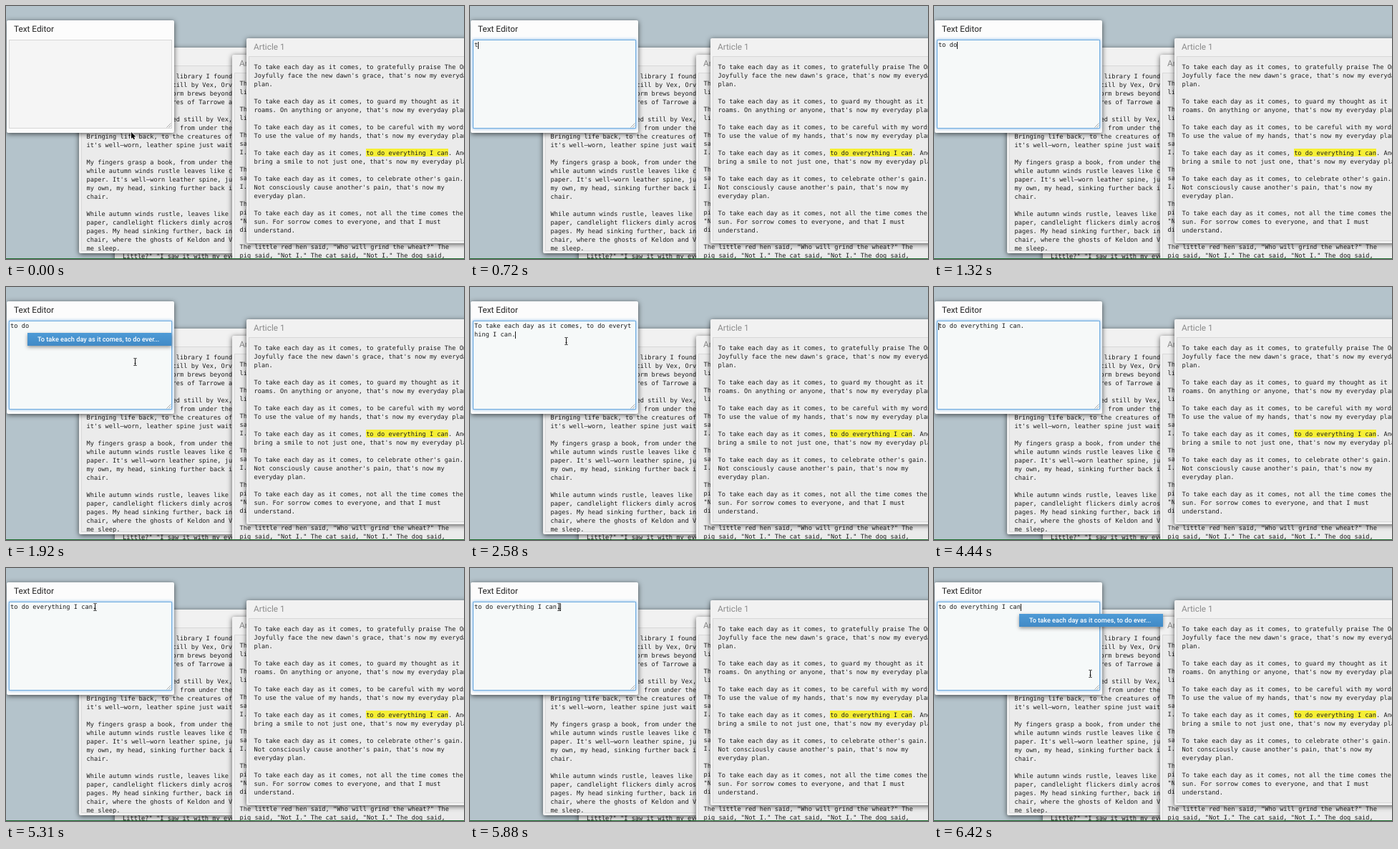
These frames come from a looping animation (640x353 px, 6450 ms). An HTML page with a canvas:

```html
<!DOCTYPE html>
<html lang="en">
<head>
<meta charset="utf-8">
<title>Text Editor</title>
<style>
  html, body { margin: 0; width: 100%; height: 100%; overflow: hidden; background: #b4c3cb; }
  canvas { display: block; }
</style>
</head>
<body>
<canvas id="stage" width="640" height="353"></canvas>
<script>
const LOOP = 6450;
const CHAR = 5.23;
const LINE = 12;
const MONO = '8.69px "DejaVu Sans Mono", monospace';
const TITLE = '11.8px Roboto, sans-serif';
const MENU = '500 9.2px Roboto, sans-serif';
const INK = '#1c1c1c';
const ctx = document.getElementById('stage').getContext('2d');
ctx.textRendering = 'geometricPrecision';

const plan = `To take each day as it comes, to gratefully praise The One.
Joyfully face the new dawn's grace, that's now my everyday
plan.

To take each day as it comes, to guard my thought as it
roams. On anything or anyone, that's now my everyday plan.

To take each day as it comes, to be careful with my words.
To use the value of my hands, that's now my everyday plan.

To take each day as it comes, to do everything I can. And
bring a smile to not just one, that's now my everyday plan.

To take each day as it comes, to celebrate other's gain.
Not consciously cause another's pain, that's now my
everyday plan.

To take each day as it comes, not all the time comes the
sun. For sorrow comes to everyone, and that I must
understand.`.split('\n');

const hen = `The
li

Th
li

Th
sa
I.

Th
sa
I.

Th
pi
"N
di

The little red hen said, "Who will grind the wheat?" The
pig said, "Not I." The cat said, "Not I." The dog said,`.split('\n');

// Only the right ends of the upper lines show beside the editor.
const library = [
  ...['library I found', 'till by Vex, Orv', 'orm brews beyond', 'res of Tarrowe a', '',
    'ed still by Vex,', 'from under the'].map(s => s.padStart(39)),
  ...`Bringing life back, to the creatures of
it's well—worn, leather spine just wait

My fingers grasp a book, from under the
while autumn winds rustle leaves like c
paper. It's well—worn leather spine, ju
my own, my head, sinking further back i
chair.

While autumn winds rustle, leaves like
paper, candlelight flickers dimly acros
pages. My head sinking further, back in
chair, where the ghosts of Keldon and V
me sleep.`.split('\n')
];

// Editor states: time, text, caret index
const wish = 'to do everything I can.';
const intro = 'To take each day as it comes, ';
const states = [
  [420, '', 0],
  ...['t', 'to', 'to ', 'to d', 'to do'].map((s, i) => [690 + i * 135, s, s.length]),
  [2500, intro + wish, 53],
  [3480, intro + wish, 30]
];
for (let n = 29; n >= 0; n--) {
  states.push([n === 29 ? 3600 : 4350 - n * 18, intro.slice(0, n) + wish, n]);
}
states.push([5430, wish, 23], [5940, wish.slice(0, -1), 22]);

const menus = [[1410, 2500], [6060, LOOP]];

// Pointer trips: time, x, y
const trips = [
  [[0, 175, 176], [350, 150, 145], [600, 150, 145]],
  [[1560, 150, 140], [1920, 180, 104], [2300, 134, 75], [2650, 134, 75], [3300, 164, 53], [3600, 164, 53]],
  [[4560, 164, 53], [4850, 166, 64], [5280, 124, 54], [5940, 124, 54]],
  [[6150, 124, 54], [6420, 218, 147], [LOOP, 218, 147]]
];

function rect(x, y, w, h, fill) {
  ctx.fillStyle = fill;
  ctx.fillRect(x, y, w, h);
}

function text(s, x, y, font, color) {
  ctx.font = font;
  ctx.fillStyle = color;
  ctx.fillText(s, x, y);
}

function shadow(color, blur, dy = 0) {
  ctx.shadowColor = color;
  ctx.shadowBlur = blur;
  ctx.shadowOffsetY = dy;
}

function panel(x, y, w, h, fill) {
  shadow('rgba(0,0,0,.65)', 7, 1.5);
  ctx.fillStyle = fill;
  ctx.beginPath();
  ctx.roundRect(x, y, w, h, 2);
  ctx.fill();
  shadow('transparent', 0);
}

function frame(x, y, w, h, color) {
  ctx.strokeStyle = color;
  ctx.lineWidth = 1;
  ctx.strokeRect(x + .5, y + .5, w - 1, h - 1);
}

function article(x, y, w, h, title, lines, mark) {
  panel(x, y, w, h, '#f1f1f1');
  rect(x + 3, y + 25, w - 6, h - 28, '#ebebeb');
  frame(x + 3, y + 25, w - 6, h - 28, '#d8d8d8');
  text(title, x + 10, y + 16, TITLE, '#8a8a8a');
  if (mark) rect(...mark, '#f6ef35');
  lines.forEach((s, i) => text(s, x + 10.5, y + 43 + i * LINE, MONO, INK));
}

function editor(t) {
  panel(1, 20, 234, 157, '#fcfcfc');
  text('Text Editor', 11, 36, TITLE, '#222');
  const state = states.findLast(s => s[0] <= t);
  if (state) shadow('rgba(90,160,225,.9)', 4);
  rect(4, 47, 228, 124, state ? '#f6f9f9' : '#f5f5f5');
  shadow('transparent', 0);
  frame(4, 47, 228, 124, state ? '#74aee0' : '#d6d6d6');
  ctx.strokeStyle = '#888';
  ctx.lineWidth = .7;
  ctx.beginPath();
  for (const d of [3, 6]) {
    ctx.moveTo(230.5 - d, 169.5);
    ctx.lineTo(230.5, 169.5 - d);
  }
  ctx.stroke();
  if (!state) return;

  const [since, s, caret] = state;
  for (let i = 0; i < s.length; i += 42) {
    text(s.slice(i, i + 42), 6, 57 + i / 42 * LINE, MONO, INK);
  }
  const caretX = 6 + caret % 42 * CHAR;
  if ((t - since) % 1000 < 500) {
    rect(Math.floor(caretX), 50 + Math.floor(caret / 42) * LINE, 1, 10, INK);
  }
  if (menus.some(([a, b]) => t >= a && t < b)) menu(Math.round(caretX - 2.4));
}

function menu(x) {
  shadow('rgba(0,0,0,.4)', 5, 2);
  const blue = ctx.createLinearGradient(0, 64, 0, 82);
  blue.addColorStop(0, '#4d9ad6');
  blue.addColorStop(1, '#418ac6');
  rect(x, 64, 201, 18, blue);
  shadow('transparent', 0);
  text(intro + 'to do ever...', x + 14, 76, MENU, '#fff');
}

function arrow(x, y) {
  const p = new Path2D('M0 0V9L2 7.2 3.5 10.3 5 9.6 3.6 6.6H6.4Z');
  ctx.save();
  ctx.translate(x, y);
  ctx.strokeStyle = '#fff';
  ctx.lineWidth = 1.4;
  ctx.stroke(p);
  ctx.fillStyle = '#000';
  ctx.fill(p);
  ctx.restore();
}

function beam(x, y) {
  ctx.save();
  ctx.translate(Math.round(x) + .5, Math.round(y));
  ctx.strokeStyle = '#111';
  ctx.lineWidth = 1;
  ctx.stroke(new Path2D('M-2-4.5H-.7L0-4 .7-4.5H2M0-4V5M-2 5.5H-.7L0 5 .7 5.5H2M-1 2.5H1'));
  ctx.restore();
}

function pointer(t) {
  const trip = trips.find(p => t >= p[0][0] && t < p.at(-1)[0]);
  if (!trip) return;
  const i = trip.findIndex(p => p[0] > t);
  const [t0, x0, y0] = trip[i - 1], [t1, x1, y1] = trip[i];
  const u = (t - t0) / (t1 - t0), e = u * u * (3 - 2 * u);
  const x = x0 + (x1 - x0) * e, y = y0 + (y1 - y0) * e;
  const overMenu = t < 2500 && t > 1410 && y < 83;
  (y > 171 || overMenu ? arrow : beam)(x, y);
}

function draw(now) {
  const t = now % LOOP;
  rect(0, 0, 640, 353, '#b4c3cb');
  panel(152, 90, 300, 300, '#ebebeb');
  text('Little?" "I saw it with my eye', 163, 352, MONO, INK);
  article(102, 58, 300, 287, '', library);
  article(316, 68, 340, 310, 'Article 2', hen);
  article(336, 45, 330, 286, 'Article 1', plan, [503, 199, 115, 11]);
  editor(t);
  rect(0, 352, 640, 1, '#1c6b2c');
  pointer(t);
  requestAnimationFrame(draw);
}
requestAnimationFrame(draw);
</script>
</body>
</html>
```
